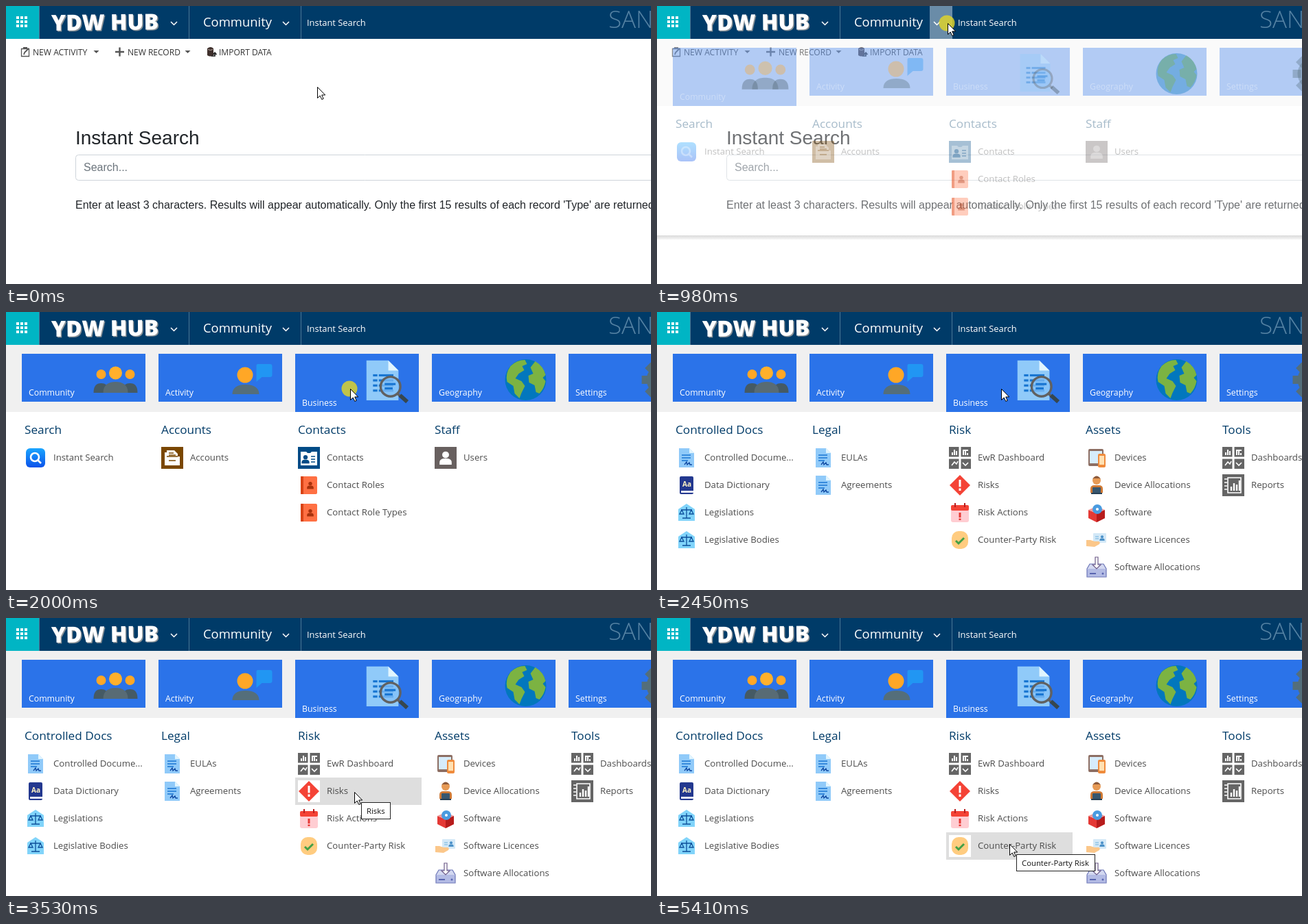
An HTML page with a canvas that plays this animation: 939 px wide and 406 px high, repeating every 5840 ms.

```html
<!DOCTYPE html>
<html lang="en">
<head>
<meta charset="utf-8">
<title>Menu navigation</title>
<style>
html, body { margin: 0; width: 100%; height: 100%; overflow: hidden; background: #fff; }
canvas { display: block; }
</style>
</head>
<body>
<canvas id="stage" width="939" height="406"></canvas>
<script>
const ctx = document.getElementById("stage").getContext("2d");
const LOOP = 5840, W = 939, H = 406;
const UI = '"Open Sans", "Noto Sans", sans-serif';
const ARIAL = '"Liberation Sans", Arial, sans-serif';
const NAVY = "#003b68", BLUE = "#2b73e9", GREY = "#656565";

// ---- drawing helpers ----
function box(x, y, w, h, color) {
  ctx.fillStyle = color;
  ctx.fillRect(x, y, w, h);
}
function round(x, y, w, h, r, color) {
  ctx.fillStyle = color;
  ctx.beginPath();
  ctx.roundRect(x, y, w, h, r);
  ctx.fill();
}
function disc(x, y, r, color) {
  ctx.fillStyle = color;
  ctx.beginPath();
  ctx.arc(x, y, r, 0, 7);
  ctx.fill();
}
function fill(path, color) {
  ctx.fillStyle = color;
  ctx.fill(new Path2D(path));
}
function line(path, color, width) {
  ctx.strokeStyle = color;
  ctx.lineWidth = width;
  ctx.stroke(new Path2D(path));
}
function text(str, x, y, size, color, family = UI, weight = 400) {
  ctx.font = `${weight} ${size}px ${family}`;
  ctx.fillStyle = color;
  ctx.fillText(str, x, y);
}
function at(x, y, draw, scale = 1) {
  ctx.save();
  ctx.translate(x, y);
  ctx.scale(scale, scale);
  draw();
  ctx.restore();
}
function faded(alpha, draw) {
  ctx.save();
  ctx.globalAlpha = alpha;
  draw();
  ctx.restore();
}

// ---- tile pictures, centred on 0,0 ----
function people() {
  for (const s of [-1, 1]) {
    disc(21 * s, -8, 7, "#ffa726");
    at(21 * s, 0, () => fill("M-11 19c0-10 4-14 11-14s11 4 11 14z", "#455a64"));
  }
  disc(0, -10, 9.5, "#ffb02c");
  fill("M-18 19c0-12 8-16 18-16s18 4 18 16z", "#586b74");
}
function chat() {
  fill("M8-23H26q3 0 3 3V-7q0 3-3 3H14L6 3V-20q0-3 2-3z", "#2196f3");
  disc(-10.5, -7, 11.5, "#ffa726");
  fill("M-29 21c0-10 8-14 19-14s20 4 20 14z", "#546e7a");
}
function inspect() {
  fill("M-29-29H1L15-15V26H-29z", "#90caf9");
  fill("M1-29L15-15H1z", "#e1f5fe");
  for (let i = 0; i < 4; i++) {
    box(-20, -10 + i * 7, 6, 3, "#1976d2");
    box(-12, -10 + i * 7, 20, 3, "#1976d2");
  }
  disc(4, 7, 13, "rgba(130,192,248,.75)");
  box(-4, 2, 15, 3, "#1976d2");
  box(-4, 8, 11, 3, "#1976d2");
  line("M17.5 7A13.5 13.5 0 1 1-9.5 7A13.5 13.5 0 1 1 17.5 7M13 16l5 5", "#616161", 3.2);
  line("M17 19l10 9", "#37474f", 5.5);
}
function globe() {
  disc(0, 0, 30, "#0277bd");
  fill("M-22-20q9-9 21-9l3 6-7 3 3 6-8 5-5 7 9 4 5 7-5 10-3 8-7-7-2-11-9-6q-3-12 5-23z", "#7cb342");
  fill("M7-18l7-9q12 7 15 20l-4 4 4 5q-2 11-9 18l-5-2-2-10-8-4-1-10 7-3z", "#7cb342");
}
function gear() {
  for (let i = 0; i < 8; i++) {
    ctx.save();
    ctx.rotate(i * Math.PI / 4);
    box(-30, -6, 12, 12, "#546e7a");
    ctx.restore();
  }
  disc(0, 0, 23, "#546e7a");
}

// ---- list icons, centred on 0,0 ----
function person(color, s = 1) {
  at(0, 0, () => {
    disc(0, -4, 4.5, color);
    fill("M-8 9V6q0-4 5-5h6q5 1 5 5v3z", color);
  }, s);
}
function mark(color, x, y, h) {
  box(x - 1.5, y, 3, h * .65, color);
  box(x - 1.5, y + h * .78, 3, h * .22, color);
}
const icons = {
  search() {
    const g = ctx.createLinearGradient(0, -14, 0, 14);
    g.addColorStop(0, "#1ba6ff");
    g.addColorStop(1, "#0b52ea");
    round(-14, -14, 28, 28, 6, g);
    line("M5-1A6 6 0 1 1-7-1A6 6 0 1 1 5-1M3.5 3.5L8 8", "#fff", 2.6);
  },
  account() {
    box(-16, -16, 32, 32, "#7a4700");
    fill("M-11-2V-8h3v-3H3l5 5v4h3V11H-11z", "#fff");
    line("M-8-2H8M-5-7H2M-5-4H5M-5 4H5", "#7a4700", 1.4);
  },
  contact() {
    box(-16, -16, 32, 32, "#004b86");
    fill("M-12-9h8l2 2h4l2-2h8V11H-12z", "#fff");
    at(-5, 2, () => person("#004b86", .7));
    line("M3-2H9M3 2H9M3 6H9", "#004b86", 1.6);
  },
  role() {
    round(-12, -13, 24, 26, 2, "#ff7043");
    box(-12, -13, 4, 26, "#d84315");
    at(2, 0, () => person("#a8320c", .6));
  },
  user() {
    box(-16, -16, 32, 32, "#68605f");
    person("#fff", 1.1);
  },
  doc() {
    fill("M-11-14H4l7 7V14H-11z", "#90caf9");
    fill("M4-14l7 7H4z", "#e1f5fe");
    line("M-7-4H6M-7 0H6M-7 4H2", "#1976d2", 1.7);
    line("M-3 10l3-4 1 4 3-3 1 3h3", "#0d47a1", 1.3);
  },
  book() {
    round(-10, -13, 20, 26, 2, "#23388f");
    box(-8, 8, 18, 3, "#e8eaf6");
    text("Aa", -6, 2, 10, "#fff3c4", UI, 700);
  },
  law() {
    fill("M0-13L12-5V12H-12V-5z", "#81d4fa");
    line("M0-8V8M-6 8H6M-8-4H8M-7-4l-3 6h6zM7-4l-3 6h6z", "#0d4f9b", 1.3);
  },
  dash() {
    box(-16, -16, 32, 32, GREY);
    line("M0-16V16M-16 0H16", "#fff", 3);
    line("M-11-4V-8M-8-4V-12M-5-4V-10M5-4V-11M8-4V-11M11-4V-7M4-11H12", "#fff", 2);
    line("M-12 11l4-5 3 3 2-4M4 7l4 4 4-4", "#fff", 1.6);
  },
  risk() {
    fill("M0-15L15 0 0 15-15 0z", "#f44336");
    mark("#fff", 0, -8, 16);
  },
  calendar() {
    round(-13, -11, 26, 25, 3, "#ffcdd2");
    round(-13, -11, 26, 8, 2, "#f44336");
    line("M-7-14V-8M7-14V-8", "#b71c1c", 2);
    mark("#e53935", 0, 0, 11);
  },
  check() {
    round(-12, -13, 24, 26, 10, "#ffcc80");
    line("M-6 1l4 4 8-8", "#43a047", 3);
  },
  devices() {
    round(-12, -13, 22, 25, 2, "#8d6e63");
    box(-10, -10, 18, 18, "#d6ecfb");
    round(2, -6, 11, 20, 2, "#ef8b3c");
    box(4, -3, 7, 13, "#ffe0b2");
  },
  worker() {
    disc(0, -7, 6, "#e79a55");
    fill("M-6-9q6-9 12 0l-2-1h-8z", "#8d5a3b");
    fill("M-9 11V5q0-5 6-5h6q6 0 6 5v6z", "#d07a35");
    round(-6, 3, 12, 8, 1, "#37566e");
    box(-8, 11, 16, 2, "#263f54");
  },
  software() {
    fill("M-12-4L0 1 12-4V8L0 14-12 8z", "#e53935");
    fill("M0 1L12-4V8L0 14z", "#b71c1c");
    fill("M-12-4L0-9 12-4 0 1z", "#ef9a9a");
    disc(1, -5, 7, "#4a9be0");
    disc(1, -5, 2, "#fff");
  },
  licence() {
    round(-5, -10, 19, 14, 1, "#d3e8f7");
    at(8, -3, () => person("#4a90c8", .45));
    line("M-2-5H3M-2-2H3", "#90c4e8", 1.3);
    fill("M-15 0h6l6 2h6q3 1 1 4L-3 10-15 9z", "#fbc78a");
  },
  drive() {
    round(-14, 2, 28, 12, 2, "#b3bbe4");
    fill("M-14 2l4-7h20l4 7z", "#d3d8f0");
    line("M-14 2l4-7h20l4 7v12h-28z", "#6c76b8", 1.2);
    box(-10, 8, 9, 2, "#5965b0");
    disc(9, 9, 1.5, "#5965b0");
    fill("M-2-15h4V-4h4l-6 6-6-6h4z", "#fff");
    line("M-2-15h4V-4h4l-6 6-6-6h4z", "#6c5a88", 1.2);
  },
  report() {
    box(-16, -16, 32, 32, GREY);
    line("M-8-11H11V11H-8z", "#fff", 1.6);
    line("M-3 8V2M1 8V-3M5 8V-1M9 8V-7", "#fff", 2.4);
    line("M-13-9h4M-13-4h4M-13 1h4M-13 6h4", "#fff", 1.6);
  }
};

const tiles = [["Community", people], ["Activity", chat], ["Business", inspect],
  ["Geography", globe], ["Settings", gear]];

const menus = {
  0: [
    ["Search", ["Instant Search", "search"]],
    ["Accounts", ["Accounts", "account"]],
    ["Contacts", ["Contacts", "contact"], ["Contact Roles", "role"], ["Contact Role Types", "role"]],
    ["Staff", ["Users", "user"]]
  ],
  2: [
    ["Controlled Docs", ["Controlled Docume...", "doc"], ["Data Dictionary", "book"],
      ["Legislations", "law"], ["Legislative Bodies", "law"]],
    ["Legal", ["EULAs", "doc"], ["Agreements", "doc"]],
    ["Risk", ["EwR Dashboard", "dash"], ["Risks", "risk"], ["Risk Actions", "calendar"],
      ["Counter-Party Risk", "check"]],
    ["Assets", ["Devices", "devices"], ["Device Allocations", "worker"], ["Software", "software"],
      ["Software Licences", "licence"], ["Software Allocations", "drive"]],
    ["Tools", ["Dashboards", "dash"], ["Reports", "report"]]
  ]
};

// ---- timeline ----
// start, duration, steps, end x, end y
const moves = [
  [100, 560, 6, 423, 25],
  [990, 330, 4, 457, 57],
  [1440, 0, 1, 463, 69],
  [1550, 110, 2, 501, 112],
  [2540, 560, 6, 507, 254],
  [3650, 460, 5, 510, 297],
  [4640, 460, 5, 513, 330]
];
const tips = [
  [3530, 3650, 517, 269, 43, "Risks"],
  [4460, 4640, 519, 312, 80, "Risk Actions"],
  [5410, LOOP, 523, 345, 115, "Counter-Party Risk"]
];
const within = (v, a, b) => v >= a && v < b;

function pointer(t) {
  let x = 453, y = 118;
  for (const [start, dur, n, ex, ey] of moves) {
    if (t < start) break;
    const step = n > 1 ? dur / (n - 1) : 1;
    const p = Math.min(n, Math.floor((t - start) / step) + 1) / n;
    const e = p * p * (3 - 2 * p);
    x += (ex - x) * e;
    y += (ey - y) * e;
  }
  return { x: Math.round(x), y: Math.round(y) };
}
// value of the last [time, value] pair reached
const stepped = (t, pairs) => pairs.reduce((v, [start, next]) => t >= start ? next : v, 0);

// ---- scene parts ----
function header(p) {
  box(0, 0, W, 48, NAVY);
  box(0, 0, 48, 48, "#00b5c4");
  for (let i = 0; i < 9; i++) box(15 + i % 3 * 6, 15 + Math.floor(i / 3) * 6, 4, 4, "#fff");

  ctx.save();
  ctx.translate(66, 36);
  ctx.rotate(-.012);
  text("YDW HUB", 1.5, 1.5, 32, "#8b9297", UI, 800);
  text("YDW HUB", 0, 0, 32, "#fff", UI, 800);
  ctx.restore();

  for (const x of [48, 266, 429]) box(x, 0, 1, 48, "#4d7695");
  if (p.y < 48 && within(p.x, 397, 430)) box(397, 0, 33, 48, "#6a8ca8");
  if (p.y < 48 && within(p.x, 430, 532)) box(430, 0, 102, 48, "#6a8ca8");
  for (const x of [244.5, 407.5]) at(x, 25, () => line("M-4.5-2L0 2.5 4.5-2", "#fff", 1.5));
  text("Community", 287, 30, 18.4, "#fff");
  text("Instant Search", 438, 29, 12.9, "#fff", UI, 500);
  text("SAN", 877, 32, 35, "#5582a3", UI, 300);
}

function page() {
  const ink = "#333", bits = "#555";
  line("M22.5 62.5h11v11h-11z", bits, 1.3);
  box(25, 60, 6, 3, bits);
  line("M26 71l1-3 6-6", bits, 1.8);
  line("M159 67h13M165.5 60.5v13", bits, 2.4);
  for (const x of [131.5, 264.5]) at(x, 67, () => fill("M-4-2H4L0 2z", bits));
  fill("M293 62q5-4 9 0v10q-4 3-9 0z", "#3f302c");
  line("M294 63.5q4 2 7 0", "#b9aaa6", 1);
  line("M299 73h5v-4M301.5 71l2.5-3 2.5 3", "#222", 1.7);
  text("NEW ACTIVITY", 39, 72, 12.1, ink);
  text("NEW RECORD", 177, 72, 12, ink);
  text("IMPORT DATA", 310, 72, 12, ink);

  text("Instant Search", 101, 202, 28, "#212529", ARIAL);
  ctx.strokeStyle = "#ced4da";
  ctx.lineWidth = 1;
  ctx.beginPath();
  ctx.roundRect(101.5, 217.5, 900, 37, 4);
  ctx.stroke();
  text("Search...", 113, 241, 16, "#6c757d", ARIAL);
  text("Enter at least 3 characters. Results will appear automatically. " +
    "Only the first 15 results of each record 'Type' are returned.", 101, 296, 16, "#212529", ARIAL);
}

function drawTiles(active, p) {
  tiles.forEach(([name, icon], i) => {
    const x = 23 + 199 * i, on = i === active;
    const hover = !on && within(p.x, x, x + 180) && within(p.y, 61, 131);
    box(x, 61, 180, on ? 85 : 70, hover ? "#6c9df0" : BLUE);
    at(x + (on ? 134.5 : 136.5), on ? 101.5 : 99, icon, on ? 1.06 : 1);
    text(name, x + 10, on ? 137 : 122, 12.3, "#fff", UI, 500);
  });
}

function drawList(menu, p) {
  menu.forEach(([title, ...items], i) => {
    const x = 23 + 199 * i;
    text(title, x + 4, 178, 17.2, NAVY, UI, 500);
    items.forEach(([label, icon], r) => {
      const y = 193 + 40 * r;
      if (within(p.x, x, x + 184) && within(p.y, y, y + 40)) {
        box(x, y, 184, 40, "#dedede");
        box(x + 4, y + 4, 32, 32, "#fff");
      }
      at(x + 20, y + 20, icons[icon]);
      text(label, x + 46, y + 24, 13.2, "#4c4c4c");
    });
  });
}

function menu(t, p) {
  const active = t < 1994 ? 0 : 2;
  box(0, 48, W, 98, "#f0f0f0");
  box(0, 146, W, (active ? H : 335) - 146, "#fff");
  if (!active) {
    const g = ctx.createLinearGradient(0, 335, 0, 341);
    g.addColorStop(0, "#969696");
    g.addColorStop(1, "#e4e4e4");
    box(0, 335, W, 6, g);
  }
  drawTiles(active, p);
  if (t < 2108) drawList(menus[0], p);
  else faded(stepped(t, [[2108, .4], [2222, .85], [2336, 1]]), () => drawList(menus[2], p));
}

function tooltip(x, y, w, label) {
  box(x, y, w, 25, "#222");
  box(x + 1, y + 1, w - 2, 23, "#fff");
  text(label, x + 8, y + 17, 11.3, "#111");
}

function arrow() {
  const shape = "M.5.5V16.5L4.2 13l2.6 5.5 2.4-1.1L6.7 12H11.7z";
  fill(shape, "#fff");
  line(shape, "#000", 1);
}

function render(t) {
  const p = pointer(t);
  box(0, 0, W, H, "#fff");
  page();
  const open = stepped(t, [[880, .35], [990, .8], [1100, .96], [1210, 1]]);
  if (open) faded(open, () => menu(t, p));
  header(p);
  for (const [from, to, ...tip] of tips) if (within(t, from, to)) tooltip(...tip);
  if (within(t, 780, 990) || within(t, 1880, 2108)) disc(p.x - 1, p.y, 11.5, "rgba(224,212,40,.82)");
  at(p.x, p.y, arrow);
}

function frame() {
  render(performance.now() % LOOP);
  requestAnimationFrame(frame);
}
frame();
</script>
</body>
</html>
```
